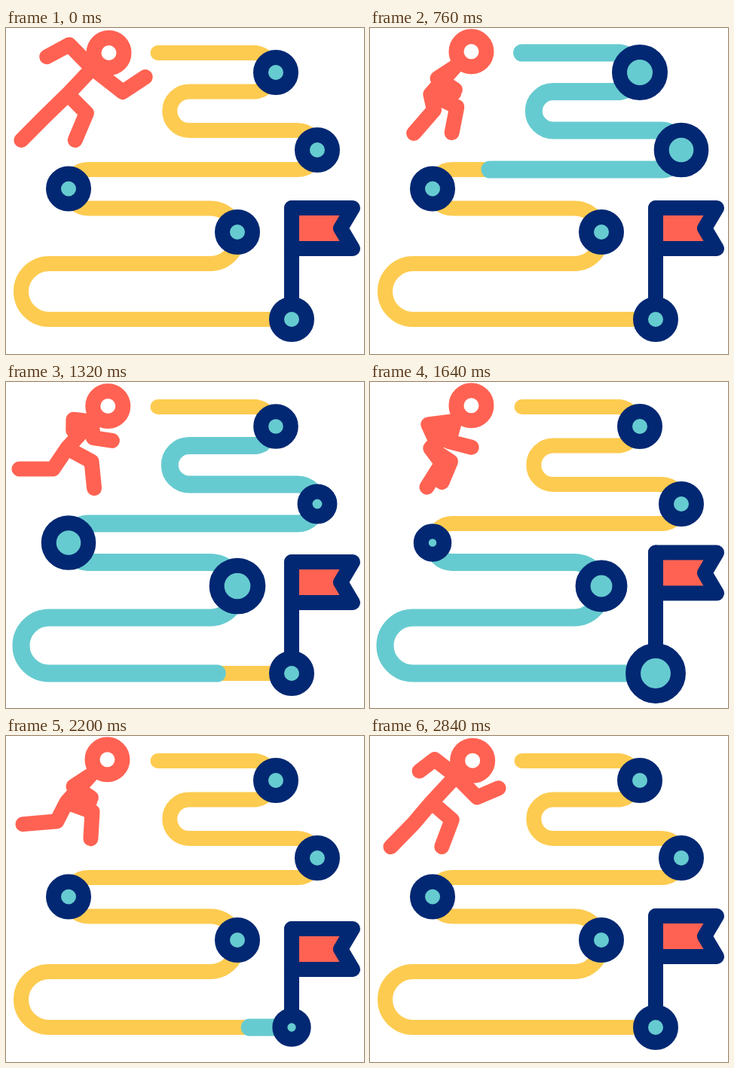
An HTML page for the animation above (2.88 s loop, 475 px wide and 433 px high).

```html
<!DOCTYPE html>
<html lang="en">
<head>
<meta charset="utf-8">
<title>Runner and route</title>
<style>
  html, body { margin: 0; width: 100%; height: 100%; overflow: hidden; background: #fff; }
  svg { display: block; width: 100%; height: 100%; }
  svg * { stroke-width: 20; stroke-linecap: round; stroke-linejoin: round; fill: none; }
  #road { stroke: #fdcb50; }
  #trail { stroke: #66cbd0; stroke-width: 23; }
  #pole, #banner { stroke: #022873; }
  #banner { fill: #ff6252; }
  #stops circle { fill: #66cbd0; stroke: #022873; }
  #runner * { stroke: #ff6252; }
</style>
</head>
<body>
<svg viewBox="0 0 475 433">
  <path id="road" d="M201.5 33H331a27 26 0 0 1 0 51.500H243a25 25 0 0 0 0 51.500H387a26 26 0 0 1 0 52H109a25 25 0 0 0 0 51.500H271a36 36 0 0 1 0 73.500H57a36 36 0 0 0 0 74H379"/>
  <path id="trail"/>
  <path id="pole"/>
  <path id="banner" d="M379 239H460L444 266L460 293H379Z"/>
  <g id="stops">
    <circle cx="358" cy="59"/>
    <circle cx="413" cy="162"/>
    <circle cx="83" cy="213.5"/>
    <circle cx="307" cy="271"/>
    <circle cx="379" cy="387"/>
  </g>
  <g id="runner">
    <circle id="head" r="20"/>
    <path id="limbs"/>
  </g>
</svg>
<script>
const LOOP = 2880, QUARTER = 240;
const RUN_START = 400, RUN_TIME = 1040, TAIL_DELAY = 840;
const PULSE_START = 370, PULSE_STEP = 270;

const $ = id => document.getElementById(id);
const set = (el, attrs) => { for (const k in attrs) el.setAttribute(k, attrs[k]); };
const clamp = u => Math.min(1, Math.max(0, u));
const mix = (a, b, u) => a + (b - a) * u;

const stops = [...$("stops").children];
const roadLength = $("road").getTotalLength();
set($("trail"), { d: $("road").getAttribute("d") });

// Distance covered along the road: a quick start that eases out.
const travel = t => roadLength * (1 - (1 - clamp((t - RUN_START) / RUN_TIME)) ** 1.35);

// One straight-sided wave: a quarter to the first peak, two to the second, one back to rest.
function wave(t, first, second) {
  const q = t / QUARTER;
  if (q < 0 || q > 4) return 0;
  if (q < 1) return first * q;
  if (q < 3) return mix(first, second, (q - 1) / 2);
  return second * (4 - q);
}

// Joint positions at each quarter of a stride. The arms share one cycle, half a stride apart.
const elbow = [[84, 22], [76, 63], [155, 85], [95, 78]];
const hand = [[54, 38], [96, 91], [185, 65], [125, 91]];
const legs = [
  { knee: [[51, 118], [115, 98], [112, 113], [92, 107]], foot: [[20, 149], [110, 134], [124, 148], [66, 138]] },
  { knee: [[107, 113], [70, 112], [55, 119], [117, 103]], foot: [[92, 149], [25, 118], [10, 113], [112, 137]] }
];

// Point on a closed cycle of poses, with the phase in quarters.
function at(cycle, phase) {
  const i = Math.floor(phase), n = cycle.length;
  const a = cycle[i % n], b = cycle[(i + 1) % n];
  return a.map((v, k) => mix(v, b[k], phase - i));
}

function drawRunner(t) {
  const phase = t / QUARTER;
  const crouch = 1 - Math.abs(1 - phase % 2);
  const head = [136.5 - 2.5 * crouch, 33 - 2 * crouch];
  const shoulder = [head[0] - 22, head[1] + 20.5];
  const hip = [82 - 2 * crouch, 88];
  const line = (...points) => "M" + points.join("L");
  const arm = p => line(shoulder, at(elbow, p), at(hand, p));
  const leg = ({ knee, foot }) => line(hip, at(knee, phase), at(foot, phase));
  set($("head"), { cx: head[0], cy: head[1] });
  set($("limbs"), { d: line(shoulder, hip) + arm(phase) + arm(phase + 2) + legs.map(leg).join("") });
}

function drawTrail(t) {
  const tail = travel(t - TAIL_DELAY), length = travel(t) - tail;
  set($("trail"), {
    "stroke-dasharray": `${length} 9999`,
    "stroke-dashoffset": -tail,
    visibility: length > 0 ? "visible" : "hidden"
  });
}

function drawStops(t) {
  stops.forEach((stop, i) => {
    set(stop, { r: 20 + wave(t - PULSE_START - i * PULSE_STEP, 12.5, -5) });
  });
  const hop = wave(t - PULSE_START - (stops.length - 1) * PULSE_STEP, -15.6, 19.5);
  set($("banner"), { transform: `translate(0 ${hop})` });
  set($("pole"), { d: `M379 ${239 + hop}V387` });
}

const begin = performance.now();
function tick() {
  const t = (performance.now() - begin) % LOOP;
  drawTrail(t);
  drawStops(t);
  drawRunner(t);
  requestAnimationFrame(tick);
}
tick();
</script>
</body>
</html>
```
